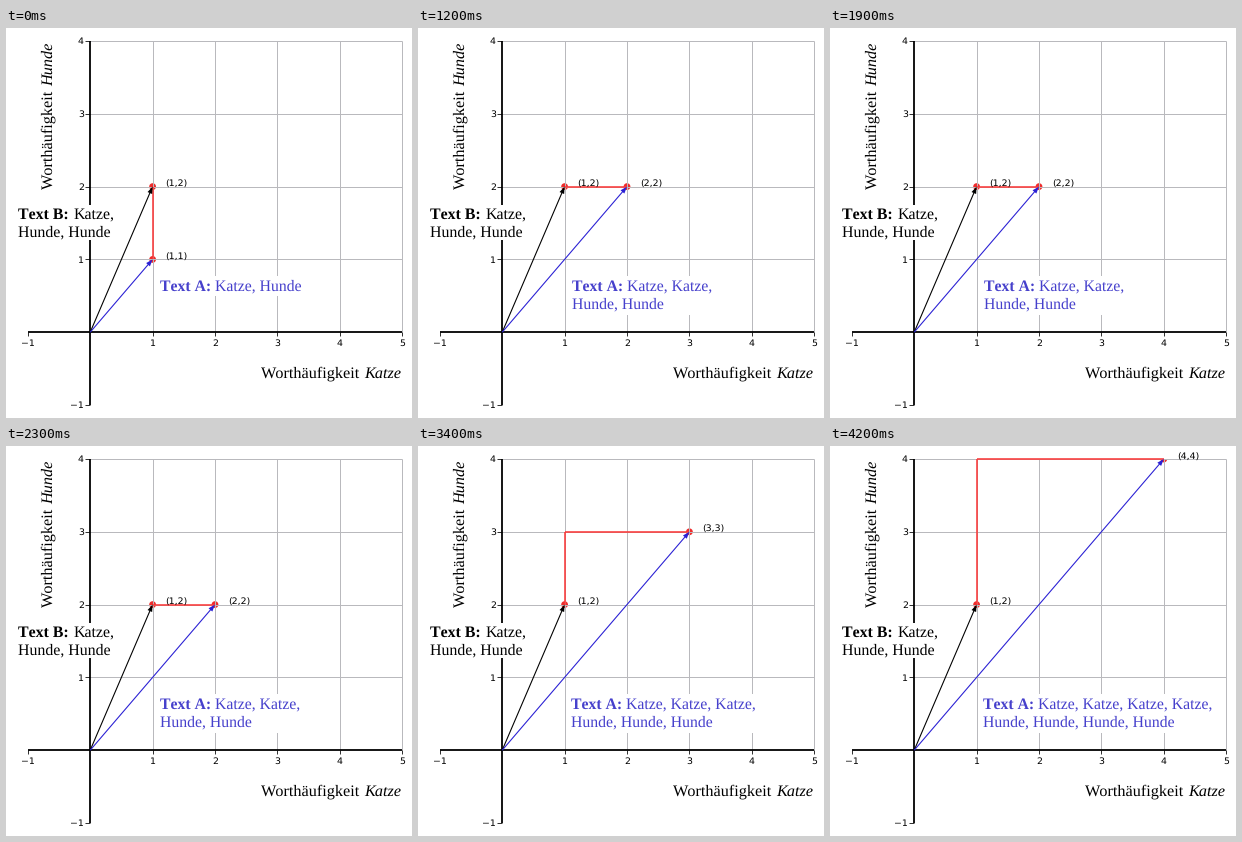
These frames come from a looping animation (406x390 px, 5 s). A matplotlib script:

```python
import matplotlib.pyplot as plt
from matplotlib.animation import FuncAnimation
from matplotlib.patches import Circle, Rectangle

W, H, DPI = 406, 390, 64
PT = 72 / DPI                      # points per pixel
FRAMES, STEP = 50, 100
SWITCH = (1200, 2500, 3600)        # ms at which text A grows
GRID, BLUE, INK = "#b9b9bd", "#2a20d4", "#4640cc"
RED, DOT = "#fa3a3a", "#ee2c2c"

# no hinting, no pair kerning
plt.rcParams.update({"text.hinting": "none", "text.kerning_factor": 6})
fig = plt.figure(figsize=(W / DPI, H / DPI), dpi=DPI, facecolor="white")
ax = fig.add_axes([0, 0, 1, 1])
ax.set(xlim=(0, W), ylim=(H, 0))
ax.axis("off")


def px(x, y):
    """Chart units to stage pixels."""
    return 84.2 + 62.4 * x, 304.2 - 72.8 * y


def line(x0, y0, x1, y1, color, width=1.0, z=2):
    return ax.plot([x0, x1], [y0, y1], color=color, lw=width * PT, zorder=z,
                   solid_capstyle="butt")[0]


def small(x, y, s, ha="center"):
    return ax.text(x, y, s, size=9.4 * PT, family="DejaVu Sans",
                   ha=ha, va="baseline", zorder=6)


def serif(x, y, runs, size, color="black", rotation=0):
    """Set styled runs one after another on a baseline."""
    made = []
    for s, style in runs:
        t = ax.text(x, y, s, size=size * PT, family="Liberation Serif",
                    color=color, rotation=rotation, rotation_mode="anchor",
                    ha="left", va="baseline", zorder=8, **style)
        box = t.get_window_extent(fig.canvas.get_renderer())
        if rotation:
            y -= box.height + size / 4
        else:
            x += box.width + size / 4
        made.append(t)
    return made, x - size / 4


def patch(x0, y0, x1, y1):
    return ax.add_patch(Rectangle((x0, y0), x1 - x0, y1 - y0, fc="white",
                                  lw=0, zorder=7))


def arrow(x, y, color):
    (x0, y0), (x1, y1) = px(0, 0), px(x, y)
    return ax.arrow(x0, y0, x1 - x0, y1 - y0, width=1.1, head_width=5,
                    head_length=7, length_includes_head=True,
                    color=color, lw=0, zorder=5)


def dot(x, y):
    c = ax.add_patch(Circle(px(x, y), 3.4, fc=DOT, lw=0, zorder=1))
    c.set_clip_path(Rectangle((0, 12.5), W, H, transform=ax.transData))
    return c


def tag(x, y):
    X, Y = px(x, y)
    return small(X + 13, Y + 0.4, f"({x},{y})", "left")


def draw_chart():
    left, bottom = px(-1, -1)
    right, top = px(5, 4)
    ox, oy = px(0, 0)
    for k in range(1, 6):
        x, y = px(k, k)
        line(x, top, x, oy, GRID)
        if k < 5:
            line(ox, y, right, y, GRID)
    line(left, oy, right, oy, "black", 1.8, 4)
    line(ox, top, ox, bottom, "black", 1.8, 4)
    for k in (-1, 1, 2, 3, 4, 5):
        x, y = px(k, k)
        name = str(k).replace("-", "\u2212")
        line(x, oy, x, oy + 4, "black", 0.8, 4)
        small(x, 318, name)
        if k < 5:
            line(ox - 5, y, ox, y, "black", 0.8, 4)
            small(78, y + 3.5, name, "right")
    italic = {"style": "italic"}
    serif(255, 350, [("Worthäufigkeit", {}), ("Katze", italic)], 16.3)
    serif(47, 161, [("Worthäufigkeit", {}), ("Hunde", italic)], 16.3,
          rotation=90)


def draw_text_b():
    arrow(1, 2, "black")
    dot(1, 2)
    tag(1, 2)
    patch(10, 177, 110, 212)
    serif(12.5, 190.5, [("Text B:", {"weight": "bold"}), ("Katze,", {})], 15.9)
    serif(12.5, 208.5, [("Hunde, Hunde", {})], 15.9)


def draw_text_a(n):
    """Everything that belongs to text A with n of each word."""
    xb, yb = px(1, 2)
    xn, yn = px(n, n)
    parts = [arrow(n, n, BLUE), dot(n, n), tag(n, n)]
    if n != 2:
        parts.append(line(xb, yb, xb, yn, RED, 1.6, 3))
    if n > 1:
        parts.append(line(xb, yn, xn, yn, RED, 1.6, 3))

    cats, dogs = ", ".join(["Katze"] * n), ", ".join(["Hunde"] * n)
    x = 154 if n < 3 else 153
    first = f"{cats}, {dogs}" if n == 1 else cats + ","
    texts, end = serif(x, 263, [("Text A:", {"weight": "bold"}), (first, {})],
                       15.8, INK)
    if n > 1:
        texts += serif(x, 281, [(dogs, {})], 15.8, INK)[0]
    parts.append(patch(x - 3, 248, end + 2, 268 if n == 1 else 287))
    return parts + texts


draw_chart()
draw_text_b()
stages = [draw_text_a(n) for n in range(1, 5)]


def update(i):
    now = sum(i * STEP >= t for t in SWITCH)
    for k, parts in enumerate(stages):
        for p in parts:
            p.set_visible(k == now)
    return []


anim = FuncAnimation(fig, update, frames=FRAMES, interval=STEP,
                     init_func=lambda: update(0), repeat=True, repeat_delay=0)
plt.show()
```
